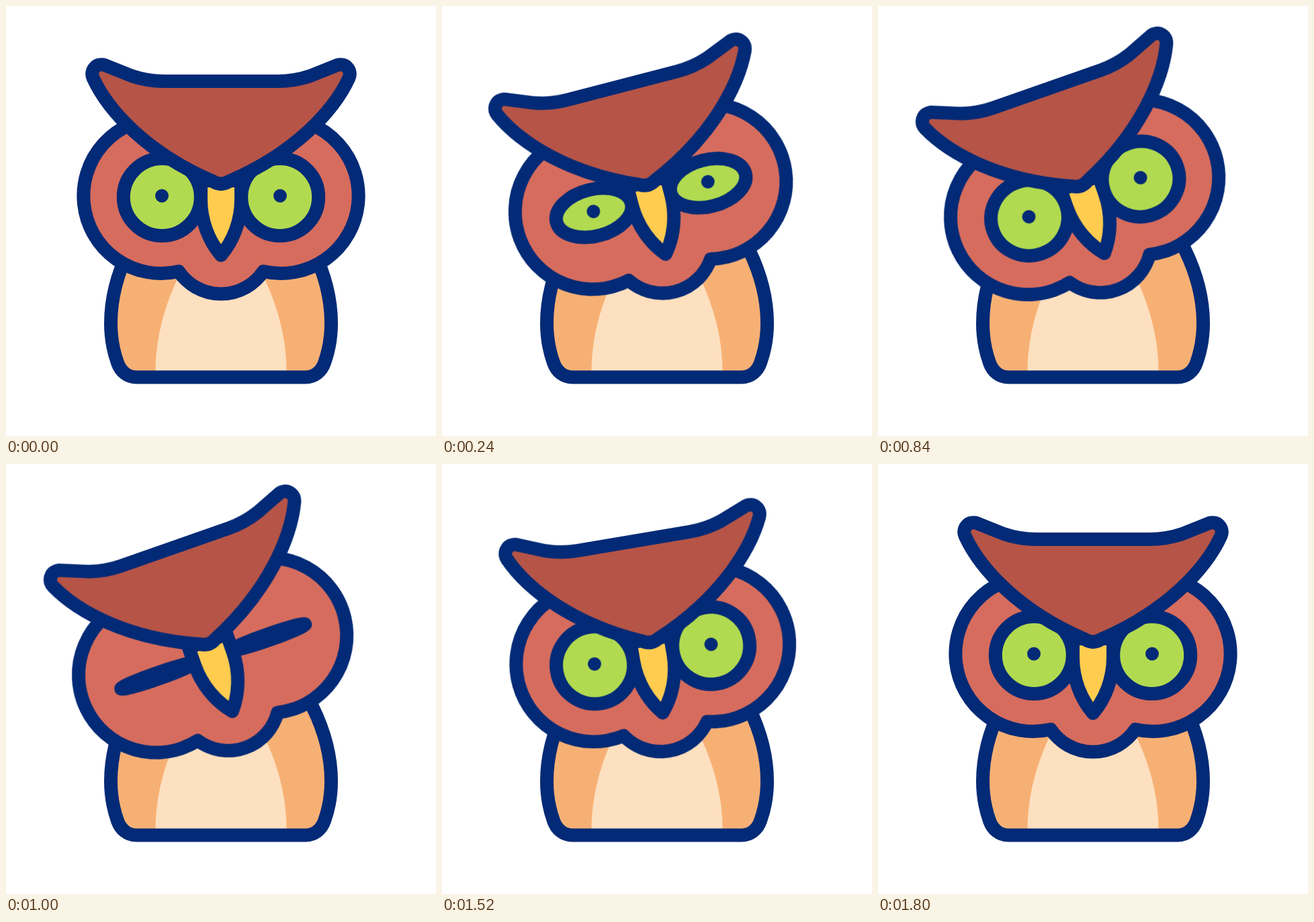
These frames come from a looping animation (640 by 640 pixels, 2000 ms). An HTML page without scripts:

```html
<!DOCTYPE html>
<html lang="en">
<head>
<meta charset="utf-8">
<title>Owl</title>
<style>
  html, body { margin: 0; width: 100%; height: 100%; overflow: hidden; background: #fff; }
  svg { display: block; width: 100%; height: 100%; }

  .line { stroke: #032a76; stroke-width: 20; stroke-linejoin: round; }
  .body { fill: #f7b074; }
  .belly { fill: #fde0bf; }
  .face { fill: #d66c5d; }
  .eye { fill: #b1da50; animation: blink 2s infinite; }
  .pupil { fill: #032a76; }
  .beak { fill: #ffcc4f; }
  .brow { fill: #b55447; }
  .head { transform-origin: 320px 320px; animation: tilt 2s infinite; }

  @keyframes tilt {
    0% { transform: rotate(0deg); animation-timing-function: cubic-bezier(.333, 0, .5, 1); }
    20% { transform: rotate(-19.3deg); }
    66% { transform: rotate(-19.3deg); animation-timing-function: cubic-bezier(.325, 0, .453, 1); }
    90%, 100% { transform: rotate(0deg); }
  }

  @keyframes blink {
    0%, 15.6%, 41.25%, 57.25%, 100% { ry: 57.5px; animation-timing-function: cubic-bezier(.333, 0, .667, 1); }
    7.6%, 49.25% { ry: 3px; animation-timing-function: cubic-bezier(.333, 0, .667, 1); }
  }
</style>
</head>
<body>
<svg viewBox="0 0 640 640">
  <path class="body" id="torso" d="M200 328 L183 363 C166 398 156 435 156 472 C156 493 159.500 513 166 531
    C170.500 544 181 552.500 194 552.500 H446 C459 552.500 469.500 544 474 531
    C480.500 513 484 493 484 472 C484 435 474 398 457 363 L440 328 Z"/>
  <path class="belly" d="M222.500 548 V542 C223 492 236 444 260 396 H380 C404 444 417 492 417.500 542 V548 Z"/>
  <use href="#torso" class="line" style="fill-opacity: 0"/>

  <g class="head">
    <path class="face line" d="M257 395 A115.500 115.500 0 1 1 232 167 H408 A115.500 115.500 0 1 1 383 395
      A76 76 0 0 1 257 395 Z"/>
    <ellipse class="eye line" cx="232.300" cy="284.500" rx="57.500" ry="57.500"/>
    <ellipse class="eye line" cx="407.700" cy="284.500" rx="57.500" ry="57.500"/>
    <circle class="pupil" cx="232" cy="282.500" r="10"/>
    <circle class="pupil" cx="408" cy="282.500" r="10"/>
    <path class="beak line" d="M290 260 V288 C290 320 302 350 320 371 C338 350 350 320 350 288 V260 Z"/>
    <path class="brow line" d="M129.500 107 A14 14 0 0 1 147 88 L187 104 C203 109.500 219 112 236 112 H404
      C421 112 437 109.500 453 104 L493 88 A14 14 0 0 1 510.500 107
      C488 156 430 219 332 261 Q320 268.500 308 261 C210 219 152 156 129.500 107 Z"/>
  </g>
</svg>
</body>
</html>
```
